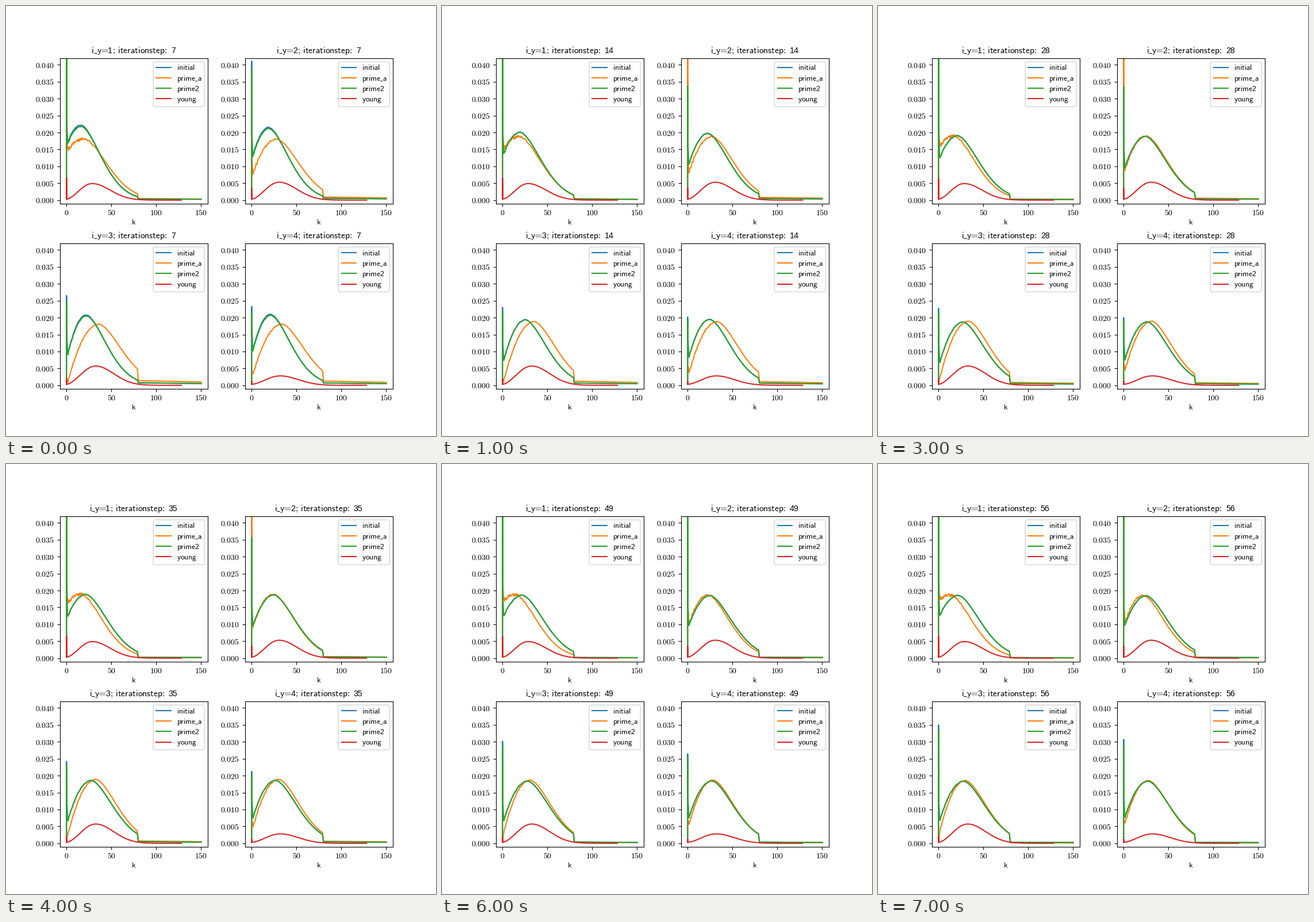
Recreate the animation shown at these times as a matplotlib script. Size 748 by 748 pixels, loop 8 s.

```python
import numpy as np
import matplotlib.pyplot as plt
from matplotlib.animation import FuncAnimation
from matplotlib.patches import FancyBboxPatch

plt.rcParams["mathtext.fontset"] = "cm"

SIZE = 748
AX_W, AX_H = 257.64, 253.0
XS, YS = (93.5, 415.56), (90.6, 412.7)
BLUE, ORANGE, GREEN, RED = "#1f77b4", "#ff7f0e", "#2ca02c", "#d62728"
UNIT = 1e-4
GAP, BACK = r"\hspace{%.3f}", r"\hspace{-0.2}"

# level (how far the curves lean to larger k), spike at k = 0, weight of "young"
PANELS = [(0, 800, 1), (1, 415, 1), (2, 268, 1), (1.7, 235, 0.5)]

K = np.concatenate([np.arange(1.5, 20, 0.7), np.arange(20, 80, 1.0)])


def spectrum(spike, dip, peak, top, width, tail, amp, seed):
    """Spike at zero, parabolic rise, bell-like fall, cut-off at k = 80."""
    rise = top - (top - dip) * (np.maximum(peak - K, 0) / (peak - 1.5)) ** 2
    fall = top * np.exp(-(np.maximum(K - peak, 0) / width) ** 1.7)
    noise = np.random.default_rng(seed).uniform(-1, 1, len(K))
    body = np.where(K < peak, rise, fall) + amp * noise * np.exp(-(K / 28) ** 2)
    head = min(spike, dip + 55)
    k = np.concatenate([[0, 0.05, 0.4, 0.85], K, [80, 150]])
    v = np.concatenate([[3, spike, head, min(head, dip + 18)], body,
                        [tail, 0.7 * tail]])
    return k, np.maximum(v, 0)


def initial(n, step):
    level, spike, _ = PANELS[n]
    s, t = 7 / step, step / 56
    return spectrum(
        spike=spike * (0.71 + 0.28 * s + 0.56 * t ** 3),
        dip=(175 - 40 * level) * (0.55 + 0.42 * s + 0.12 * t),
        peak=23 + 3 * level - 7 * s,
        top=180 + (42 - 7 * level) * s,
        width=36 - 3.5 * s,
        tail=(4 + 2 * level) * (1 - 0.6 * t),
        amp=1.5, seed=n)


def prime_a(n, step):
    level = PANELS[n][0]
    s, t = 7 / step, step / 56
    return spectrum(
        spike=(15 + 1600 * (1 - level / 2) ** 2) * (1.4 - 0.6 * s),
        dip=145 - 69 * level + 30 * t,
        peak=21 + 8 * level - 7 * t,
        top=200 - 17.6 * s - 12 * t,
        width=34 + 2.5 * s,
        tail=(5 + 5 * level) * (1.05 - 0.95 * t),
        amp=6 - 1.8 * level, seed=n + 10)


def prime2(k, v, step):
    """A slightly flatter copy that converges to the first curve."""
    d = 0.028 * (7 / step) ** 2
    out = v * (1 - d * (1 - np.minimum(k, 79) / 45))
    out[1] *= 0.955
    return out


def young(n):
    level, _, weight = PANELS[n]
    peak, top = 28.5 + 2 * level, (49 + 4 * level) * weight
    k = np.arange(0.5, 128.5, 0.5)
    left = 3 + (top - 3) * np.sin(np.pi / 2 * np.minimum(k / peak, 1)) ** 1.7
    right = top * np.exp(-(k - peak) ** 2 / 800)
    v = np.where(k < peak, left, right)
    spike = 65 * 0.55 ** level * weight
    return np.r_[0, 0.05, k], np.r_[3, spike, v] * UNIT


fig = plt.figure(figsize=(7.48, 7.48), dpi=100, facecolor="white")
page = fig.add_axes([0, 0, 1, 1], zorder=5)
page.set_xlim(0, SIZE)
page.set_ylim(SIZE, 0)
page.axis("off")


def rule(x0, x1, y, color, lw):
    return page.plot([x0, x1], [y, y], color=color, lw=lw,
                     solid_capstyle="butt")[0]


def word(x, y, s, size, **kw):
    return page.text(x, y, rf"$\mathsf{{{s}}}$", size=size, va="baseline", **kw)


def number(x, y, n, size):
    return page.text(x, y, str(n), size=0.9 * size, va="baseline",
                     family="Liberation Sans")


class Title:
    SIZE_PT, EM = 11.25, 15.62

    def __init__(self, cx, y, n):
        self.cx = cx
        tail = ";" + GAP % 0.18 + "iterationstep" + BACK + ":"
        self.step = number(0, y, "", self.SIZE_PT)
        self.parts = [
            (0, word(0, y, "i", self.SIZE_PT)),
            (0.599, word(0, y, "y" + BACK + "=", self.SIZE_PT)),
            (1.838, number(0, y, n, self.SIZE_PT)),
            (2.338, word(0, y, tail, self.SIZE_PT)),
            (8.86, self.step)]
        self.bar = rule(0, 0, y + 0.2, "black", 0.8)

    def show(self, step):
        self.step.set_text(str(step))
        x0 = self.cx - self.EM * (8.86 + 0.5 * len(str(step))) / 2
        for offset, part in self.parts:
            part.set_x(x0 + offset * self.EM)
        self.bar.set_xdata([x0 + 0.3 * self.EM, x0 + 0.6 * self.EM])


def legend(x, y):
    page.add_patch(FancyBboxPatch(
        (x + 162.5, y + 6.6), 89.2, 78, fc="white", ec="#cccccc", lw=1,
        alpha=0.8, boxstyle="round,pad=0,rounding_size=2.8"))
    rows = [("initial", BLUE), ("prime" + GAP % 0.41 + "a", ORANGE),
            ("prime", GREEN), ("young", RED)]
    for i, (name, color) in enumerate(rows):
        ly = y + 15.9 + 18.3 * i
        rule(x + 167, x + 194.7, ly, color, 1.5)
        word(x + 203.3, ly + 4.9, name, 9.7)
    rule(x + 235.2, x + 239.4, y + 39.4, "black", 0.7)
    number(x + 234.8, y + 57.4, 2, 9.7)


def panel(n):
    x, y = XS[n % 2], YS[n // 2]
    ax = fig.add_axes([x / SIZE, 1 - (y + AX_H) / SIZE,
                       AX_W / SIZE, AX_H / SIZE])
    ax.set_xlim(-7.5, 157.5)
    ax.set_ylim(-0.001, 0.042)
    xt, yt = range(0, 151, 50), np.arange(9) * 0.005
    ax.set_xticks(xt, [f"${v}$" for v in xt])
    ax.set_yticks(yt, [f"${v:.3f}$" for v in yt])
    ax.tick_params(labelsize=10)
    lines = [ax.plot([], [], color=c, lw=1.5)[0]
             for c in (BLUE, ORANGE, GREEN)]
    ax.plot(*young(n), color=RED, lw=1.5)
    legend(x, y)
    word(x + AX_W / 2 - 0.5, y + 289.3, "k", 9.7, ha="center")
    return lines, Title(x + AX_W / 2 - 0.8, y - 8.5, n + 1)


panels = [panel(n) for n in range(4)]


def draw(i):
    step = 7 * (i + 1)
    for n, (lines, title) in enumerate(panels):
        title.show(step)
        k, v = initial(n, step)
        ka, va = prime_a(n, step)
        lines[0].set_data(k, v * UNIT)
        lines[1].set_data(ka, va * UNIT)
        lines[2].set_data(k, prime2(k, v, step) * UNIT)
    return []


anim = FuncAnimation(fig, draw, frames=8, interval=1000, repeat=True,
                     repeat_delay=0)
plt.show()
```
